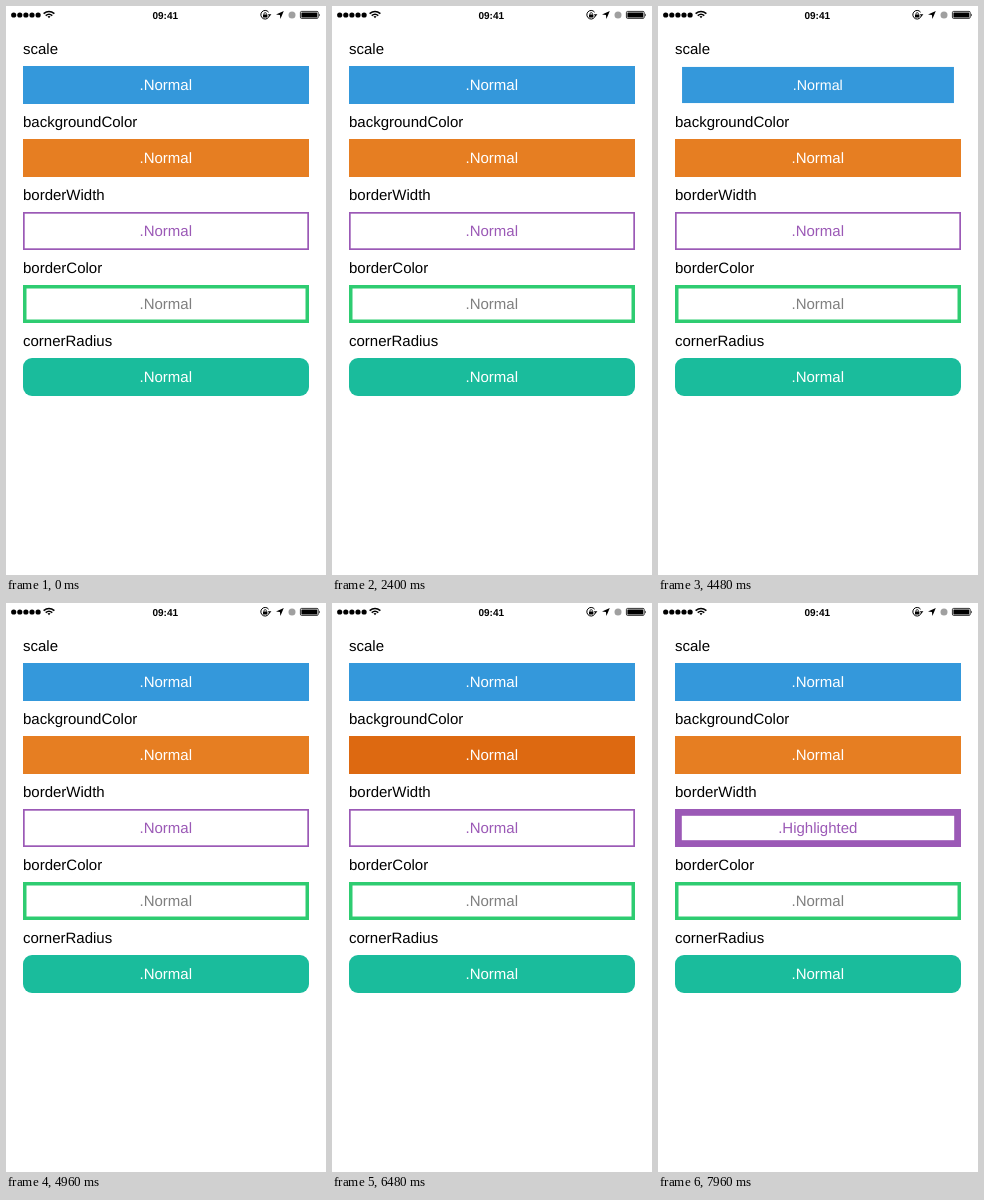
An HTML page that plays this animation: 320x569 px, repeating every 8 s.

```html
<!DOCTYPE html>
<html lang="en">
<head>
<meta charset="utf-8">
<title>Button states</title>
<style>
  html, body { margin: 0; width: 100%; height: 100%; overflow: hidden; background: #fff; }
  svg { display: block; width: 100%; height: 100%; }
  text { font: 15px "Liberation Sans", Arial, sans-serif; text-rendering: geometricPrecision; }
  .mid { text-anchor: middle; }
  .clock { font-size: 10px; font-weight: bold; }
  .line { fill: none; stroke: #000; }
</style>
</head>
<body>
<svg viewBox="0 0 320 569">
  <g id="dots"></g>
  <g class="line" stroke-width="1.5">
    <path d="M37.6 7.7Q43 3.2 48.4 7.7M39.7 9.7Q43 7 46.3 9.7"/>
    <path d="M43 12.2l-1.5-1.6q1.5-1.2 3 0z" fill="#000" stroke="none"/>
  </g>
  <text class="mid clock" x="159.3" y="12.6">09:41</text>
  <path class="line" d="M262.6 6.2A4.3 4.3 0 1 0 263.4 9.3"/>
  <path d="M261.8 8.2h3.6l-1.8 2.4zM257 8.5h4.4v3H257z"/>
  <path class="line" stroke-width=".8" d="M258 8.6v-.8a1.2 1.2 0 0 1 2.4 0v.8"/>
  <path d="M277.8 5l-3.4 7.9-.5-3.9-3.9-.5z"/>
  <circle cx="286" cy="9" r="3.5" fill="#a0a0a0"/>
  <rect class="line" x="294.4" y="5.4" width="17.8" height="7" rx="1.2" stroke-width=".8"/>
  <rect x="295.4" y="6.4" width="15.8" height="5" rx=".5"/>
  <path d="M313.2 7.5q1.7 1.4 0 2.9z"/>
  <g id="rows"></g>
</svg>
<script>
const LOOP = 8000;
const el = (parent, tag, attrs, text = "") => {
  const node = document.createElementNS("http://www.w3.org/2000/svg", tag);
  for (const key in attrs) node.setAttribute(key, attrs[key]);
  node.textContent = text;
  return parent.appendChild(node);
};
const byId = id => document.getElementById(id);

for (let i = 0; i < 5; i++) el(byId("dots"), "circle", { cx: 7.7 + 6.1 * i, cy: 9, r: 2.6 });

// title, fill, border colour, border width, corner radius, label colour
const buttons = [
  ["scale", "#3498db", "none", 0, 0, "#fff"],
  ["backgroundColor", "#e67e22", "none", 0, 0, "#fff"],
  ["borderWidth", "#fff", "#9b59b6", 1.7, 0, "#9b59b6"],
  ["borderColor", "#fff", "#2ecc71", 3.5, 0, "#7f7f7f"],
  ["cornerRadius", "#1abc9c", "none", 0, 9, "#fff"]
].map(([title, fill, stroke, border, rx, color], i) => {
  const y = 60 + 73 * i;
  el(byId("rows"), "text", { x: 17, y: y - 12 }, title);
  const group = el(byId("rows"), "g", {});
  const box = el(group, "rect", { fill, stroke, rx });
  const label = el(group, "text", { class: "mid", x: 159.8, y: y + 24.3, fill: color });
  const button = {
    setBorder(w) {
      const size = { x: 17 + w / 2, y: y + w / 2, width: 286 - w, height: 38 - w, "stroke-width": w };
      for (const key in size) box.setAttribute(key, size[key]);
    },
    setFill(c) { box.setAttribute("fill", c); },
    setScale(s) {
      group.setAttribute("transform", `translate(160 ${y + 19}) scale(${s}) translate(-160 ${-y - 19})`);
    },
    setPressed(on) {
      const text = on ? ".Highlighted" : ".Normal";
      if (label.textContent !== text) label.textContent = text;
    }
  };
  button.setBorder(border);
  button.setPressed(false);
  return button;
});

const ease = (t, start, length) => {
  const p = Math.min(1, Math.max(0, (t - start) / length));
  return p * p * (3 - 2 * p);
};
const mix = (a, b, p) => a + (b - a) * p;
const [scaleBtn, fillBtn, borderBtn] = buttons;

function draw(t) {
  scaleBtn.setPressed(t >= 3400 && t < 4480);
  scaleBtn.setScale(mix(1, 0.95, ease(t, 3400, 300) - ease(t, 4460, 300)));

  fillBtn.setPressed(t >= 5520 && t < 6360);
  const dark = ease(t, 5500, 300) - ease(t, 6330, 300);
  fillBtn.setFill(`rgb(${mix(230, 211, dark)},${mix(126, 84, dark)},${mix(34, 0, dark)})`);

  borderBtn.setPressed(t >= 7720);
  borderBtn.setBorder(t < 7720 ? 1.7 : mix(2.8, 6.8, ease(t, 7750, 210)));
}

const origin = performance.now();
function frame() {
  draw((performance.now() - origin) % LOOP);
  requestAnimationFrame(frame);
}
frame();
</script>
</body>
</html>
```
